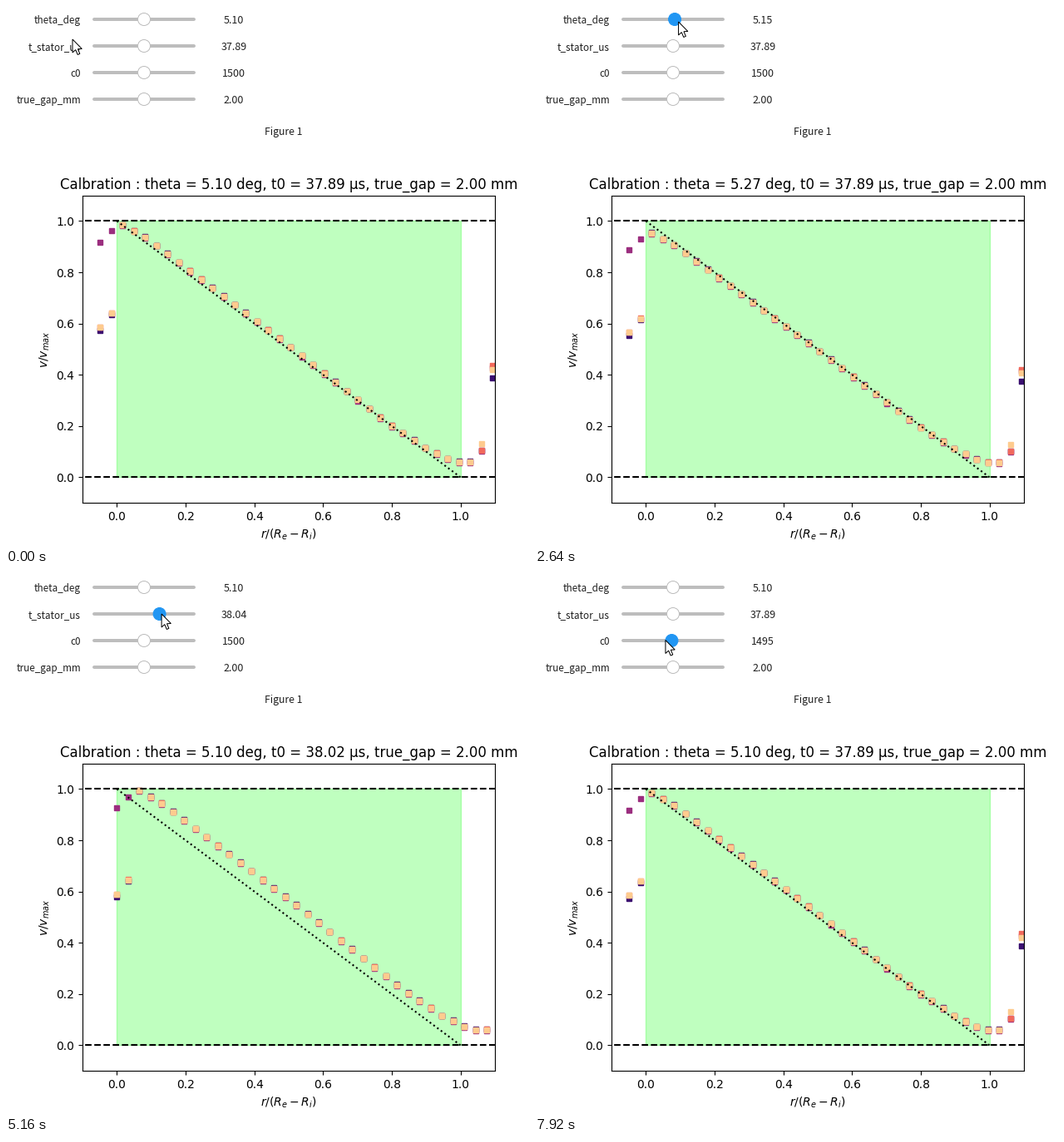
A matplotlib script that plays this animation: 629 by 649 pixels, repeating every 8 s.

```python
import numpy as np
import matplotlib.pyplot as plt
from matplotlib.animation import FuncAnimation
from matplotlib.patches import Circle, Polygon, Rectangle

W, H, DPI = 629, 649, 100
LOOP, STEP = 8000, 40
TICK = 120  # the screen refreshes on this grid, in ms

# Key points in ticks, joined by straight moves
THETA = [(9, 5.10), (12, 5.56), (14, 5.42), (18, 5.27), (22, 5.15), (26, 5.12), (29, 5.10)]
T0 = [(38, 37.89), (40, 38.02), (43, 38.04), (44, 38.06), (46, 38.02),
      (49, 37.93), (53, 37.90), (57, 37.90), (58, 37.89)]
MOUSE = [(0, 80, 40), (1, 67, 37), (3, 118, 21), (6, 175, 19), (7, 170.5, 19),
         (32, 170.5, 19), (34, 178, 28), (38, 168.5, 48), (59, 168.5, 48), (64, 158.5, 79.5)]
CLICKS = [7, 38, 66]  # when each of the first three sliders is grabbed

# name, centre value, half range, number format
SLIDERS = [("theta_deg", 5.10, 1.5, "{:.2f}"), ("t_stator_us", 37.89, 0.5, "{:.2f}"),
           ("c0", 1500, 200, "{:.0f}"), ("true_gap_mm", 2.00, 1.0, "{:.2f}")]
BLUE, GREY = "#2196f3", "#bdbdbd"

# Shared velocity profile (radius, speed) inside the gap
PROFILE = [(.016, .985), (.082, .936), (.114, .904), (.506, .508), (.767, .233),
           (.800, .200), (.898, .115), (.963, .072), (.995, .060), (1.028, .060)]
# colour, ripple, speeds at the two leftmost and two rightmost points
CURVES = [("#3b0f70", .003, (.573, .636, .106, .387)),
          ("#9b2e7f", -.004, (.918, .961, .103, .428)),
          ("#f1695c", .001, (.585, .641, .105, .435)),
          ("#fecb8e", 0, (.585, .640, .131, .421))]
N = 36
RADIUS = -.0488 + .03263 * np.arange(N)


def along(keys, tick):
    """Position on a key-point track, one value per column."""
    t, *cols = np.array(keys).T
    return [np.interp(tick, t, c) for c in cols]


def profile(ripple, ends):
    v = np.interp(RADIUS, *np.array(PROFILE).T)
    v += ripple * np.abs(np.sin(1.3 * np.arange(N)))
    v[[0, 1, -2, -1]] = ends
    return v


plt.rcParams["font.family"] = "DejaVu Sans"
fig = plt.figure(figsize=(W / DPI, H / DPI), dpi=DPI, facecolor="white")

# Plot
ax = fig.add_axes([92 / W, 1 - 597.2 / H, 496 / W, 369.6 / H])
ax.add_patch(Rectangle((0, 0), 1, 1, color="lime", alpha=.25, lw=1, zorder=.5))
for y in (0, 1):
    ax.plot([-.2, 1.2], [y, y], "k--", zorder=3)
ax.plot([0, 1], [1, 0], "k:", zorder=3)
dots = [ax.plot([], [], "s", ms=4, color=c, zorder=2)[0] for c, *_ in CURVES]
speeds = [profile(*rest) for _, *rest in CURVES]
ax.set(xlim=(-.1, 1.1), ylim=(-.1, 1.1), xlabel="$r/(R_e - R_i)$", ylabel="$v/v_{max}$",
       xticks=np.arange(0, 1.1, .2), yticks=np.arange(0, 1.1, .2))
title = ax.set_title("")

# Widgets, in pixels from the top left
ui = fig.add_axes([0, 0, 1, 1], zorder=5)
ui.set(xlim=(0, W), ylim=(H, 0))
ui.axis("off")


def label(x, y, text, ha, size):
    return ui.text(x, y, text, ha=ha, va="baseline", fontsize=size,
                   family="Noto Sans CJK JP", color="#202020")


thumbs, readouts = [], []
for n, (name, *_) in enumerate(SLIDERS):
    y = 16 + 32 * n
    label(90, y + 4.7, name, "right", 8.4)
    ui.plot([106, 226], [y, y], color=GREY, lw=4 * .72, solid_capstyle="round")
    thumbs.append(ui.add_patch(Circle((166, y), 7.5, lw=.72, zorder=3)))
    readouts.append(label(274, y + 4.7, "", "center", 9))
label(334, 155, "Figure 1", "center", 8.8)

ARROW = np.array([(0, 0), (0, 16), (3.7, 12.6), (6.2, 18.5), (8.8, 17.4),
                  (6.4, 11.7), (11.3, 11.5)])
cursor = ui.add_patch(Polygon(ARROW, fc="white", ec="black", lw=.72, zorder=6))


def settings(tick):
    theta, t0 = along(THETA, tick)[0], along(T0, tick)[0]
    return [theta, t0, 1495 if tick >= CLICKS[2] else 1500, 2.00]


def update(frame):
    tick = frame * STEP // TICK
    values = settings(tick)
    focus = np.searchsorted(CLICKS, tick, side="right") - 1

    tip = np.array(along(MOUSE, tick))
    for n, (_, mid, half, fmt) in enumerate(SLIDERS):
        shift = 62 * (values[n] - mid) / half
        thumbs[n].set_center((166 + shift, 16 + 32 * n))
        thumbs[n].set_facecolor(BLUE if n == focus else "white")
        thumbs[n].set_edgecolor(BLUE if n == focus else GREY)
        readouts[n].set_text(fmt.format(values[n]))
        if n == focus:
            tip[0] += shift  # the pointer carries the grabbed thumb
    cursor.set_xy(ARROW + tip)

    # The plot redraws every second tick and trails the sliders
    theta, t0, *_ = settings((tick - 1) // 2 * 2 - 2)
    delay = t0 - SLIDERS[1][1]
    gain = 5.10 / theta * (1 + .067 * delay)
    for dot, v in zip(dots, speeds):
        dot.set_data(RADIUS + .3735 * delay, v * gain)
    title.set_text(f"Calbration : theta = {theta:.2f} deg, t0 = {t0:.2f} µs, "
                   "true_gap = 2.00 mm")
    return [*dots, *thumbs, *readouts, title, cursor]


anim = FuncAnimation(fig, update, frames=LOOP // STEP, interval=STEP,
                     repeat=True, repeat_delay=0, blit=False)
plt.show()
```
